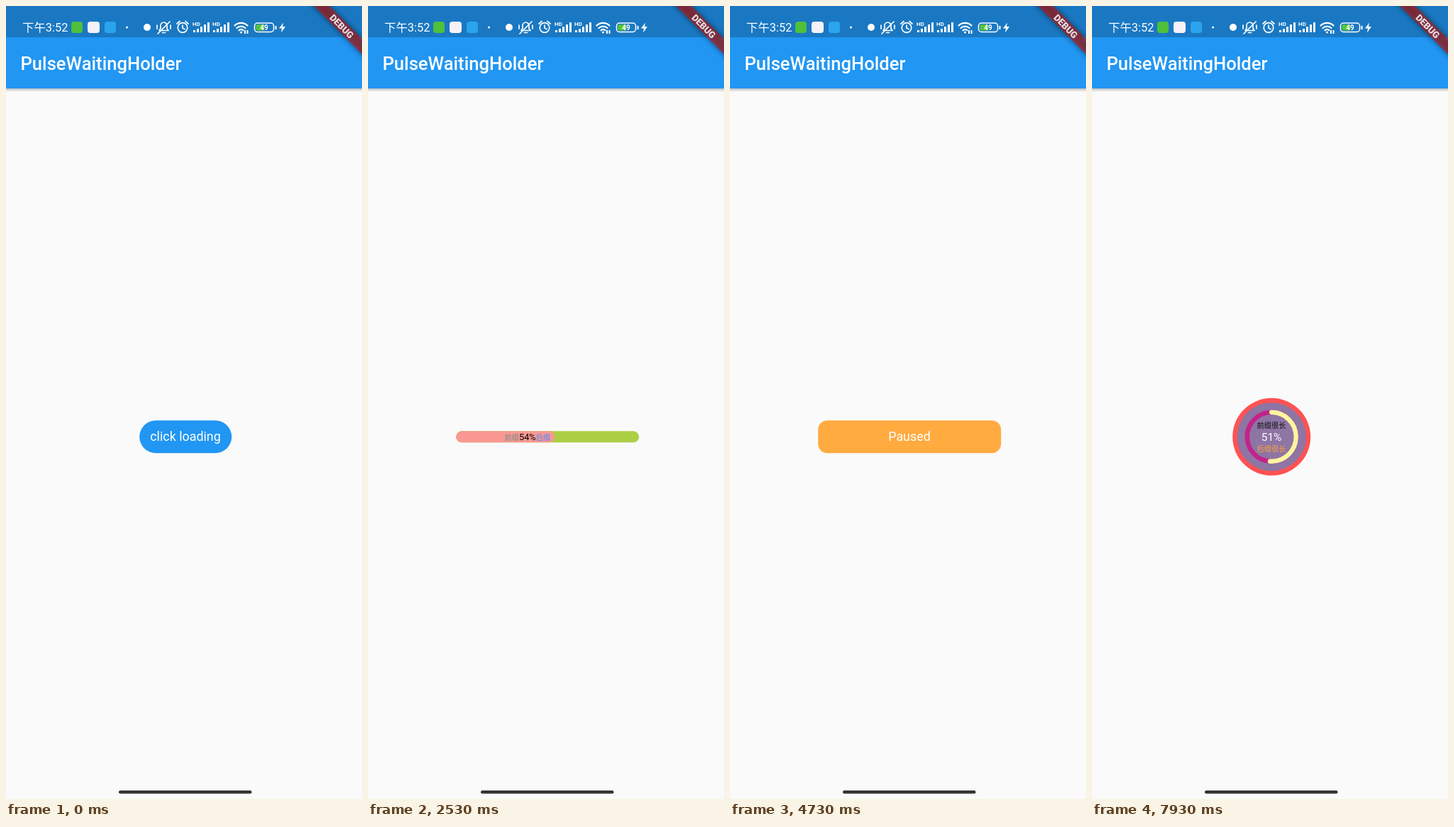
Animation, 502 px wide and 1116 px high, one loop 8000 ms. Source, as an HTML page:

```html
<!DOCTYPE html>
<html lang="zh">
<head>
<meta charset="utf-8">
<title>Button states</title>
<style>
html, body { margin: 0; width: 100%; height: 100%; overflow: hidden; background: #fafafa; }
svg { display: block; width: 100%; height: 100%; }
text { font-family: Roboto, "Noto Sans CJK SC", "Noto Sans CJK", sans-serif; }
.mid { text-anchor: middle; }
.line { fill: none; stroke: #fff; stroke-width: 1.7; stroke-linecap: round; stroke-linejoin: round; }
.soft { filter: blur(4.4px); }
</style>
</head>
<body>
<svg viewBox="0 0 502 1116">
  <defs>
    <linearGradient id="shade" x2="0" y2="1">
      <stop stop-color="#000" stop-opacity=".24"/>
      <stop offset="1" stop-color="#000" stop-opacity="0"/>
    </linearGradient>
    <g id="signal" fill="#fff">
      <text x="-1" y="27.5" font-size="8" font-weight="700">HD</text>
      <path d="M0 34h3v3h-3zM5 32h3v5h-3zM10 29h3v8h-3zM15 26h3v11h-3zM20 23h3v14h-3z"/>
    </g>
  </defs>

  <rect width="502" height="1116" fill="#fafafa"/>
  <rect y="116" width="502" height="5" fill="url(#shade)"/>
  <rect width="502" height="116" fill="#2196f3"/>
  <rect width="502" height="44" fill="#1a78c2"/>
  <text x="20.5" y="90" font-size="25.6" font-weight="500" fill="#fff">PulseWaitingHolder</text>

  <!-- status bar -->
  <text x="23" y="36" font-size="16.4" fill="#fff">下午3:52</text>
  <rect x="92" y="22" width="16" height="16" rx="4" fill="#4fc03a"/>
  <rect x="115" y="22" width="17" height="16" rx="4" fill="#f6f1f6"/>
  <rect x="139" y="22" width="16" height="16" rx="4" fill="#2ba4ee"/>
  <circle cx="170.5" cy="30" r="1.5" fill="#fff"/>
  <circle cx="199" cy="30" r="5" fill="#fff"/>
  <g class="line">
    <path d="M216 34.5h13l-2-3v-4a4.5 4.5 0 0 0-9 0v4zM220.5 37.5h4M214 39l17-17M213 27v5M232 27v5"/>
    <circle cx="249" cy="30.5" r="6.8"/>
    <path d="M249 27v4l3 1.5M241 25l4-3.5M257 25l-4-3.5"/>
    <path d="M322.5 27.5a13 13 0 0 1 18 0M325.5 31a9 9 0 0 1 12 0M328.5 34.3a4.5 4.5 0 0 1 6 0" stroke-width="2.2"/>
    <rect x="350.5" y="24" width="27" height="12.5" rx="4" stroke-width="1.5"/>
  </g>
  <circle cx="331.5" cy="37" r="1.5" fill="#fff"/>
  <path d="M336 34h2v5h-2zM339.5 34h2v5h-2zM379.5 28h2v5h-2zM391 23.5l-6 8h4l-1 6 6-8.5h-4z" fill="#fff"/>
  <use href="#signal" x="264"/>
  <use href="#signal" x="292"/>
  <rect x="352.5" y="26" width="12" height="8.5" rx="2" fill="#55c43d"/>
  <text class="mid" x="364" y="34" font-size="10" font-weight="700" fill="#fff">49</text>

  <g transform="translate(502 0) rotate(45)">
    <rect class="soft" x="-60" y="32.6" width="120" height="15.4" fill-opacity=".5"/>
    <rect x="-60" y="32.6" width="120" height="15.4" fill="#b71c1c" fill-opacity=".63"/>
    <text class="mid" y="45" font-size="13" font-weight="900" fill="#e9dfe6">DEBUG</text>
  </g>
  <rect x="159" y="1104" width="187.5" height="4.5" rx="2.25" fill="#353535"/>

  <rect id="box"/>
  <text id="label" class="mid" x="253" y="612.3" font-size="17.9" fill="#fff"></text>

  <g id="bar">
    <rect id="fill"/>
    <text id="barText" y="610.5" font-size="10.22" text-anchor="end"><tspan fill="#718a8c">前缀</tspan><tspan id="barNum" font-size="12.78" fill="#000"></tspan><tspan fill="#448aff">后缀</tspan></text>
  </g>

  <g id="ring">
    <rect id="inner"/>
    <g fill="none" stroke-width="6.4" transform="translate(253.2 606.3) rotate(-90)">
      <circle id="track" r="34.5"/>
      <circle id="arc" r="34.5" stroke-linecap="round" pathLength="100"/>
    </g>
    <g class="mid">
      <text x="253" y="594" font-size="10.22" fill="#111">前缀很长</text>
      <text id="ringNum" x="253" y="611.5" font-size="15.34" fill="#fff"></text>
      <text x="253" y="627" font-size="10.22" fill="#ffa03c">后缀很长</text>
    </g>
  </g>
</svg>
<script>
const LOOP = 8000, BAR = 905, PAUSE = 3905, RING = 6380, MORPH = 325, STEP = 30;
const CX = 253.2, CY = 606.3, PAD = 6.4;

const BLUE = [33, 150, 243], GREEN = [76, 175, 80], YELLOW = [255, 235, 59], WHITE = [255, 255, 255],
  RED = [244, 67, 54], CORAL = [255, 82, 82], ORANGE = [255, 171, 64],
  PINK = [233, 30, 99], PURPLE = [156, 39, 176];

// width, height, corner radius
const IDLE = [130, 46, 23], THIN = [258, 16, 8], WIDE = [258, 46, 13], ROUND = [110, 109, 55];

const $ = id => document.getElementById(id);
const set = (id, attrs) => { for (const k in attrs) $(id).setAttribute(k, attrs[k]); };
const mix = (a, b, p) => a.map((v, i) => v + (b[i] - v) * p);
const rgb = c => `rgb(${c.map(Math.round)})`;
const show = (id, on) => set(id, { display: on ? "inline" : "none" });

function rect(id, [w, h, r], color, width = w) {
  set(id, { x: CX - w / 2, y: CY - h / 2, width, height: h, rx: r, ry: r, fill: rgb(color) });
}

function drawBar(size, p) {
  const left = CX - size[0] / 2, width = size[0] * p;
  rect("box", size, mix(GREEN, YELLOW, p));
  rect("fill", size, mix(WHITE, RED, p), width);
  $("barNum").textContent = Math.round(p * 100) + "%";
  const textWidth = $("barText").getComputedTextLength();
  set("barText", { x: left + Math.max(PAD + textWidth, width - PAD) });
}

function drawRing(size, p, m) {
  rect("box", size, mix(ORANGE, CORAL, m));
  rect("inner", [size[0] - 2 * PAD, size[1] - 2 * PAD, Math.max(0, size[2] - PAD)], mix(CORAL, BLUE, p));
  set("track", { stroke: rgb(mix(PINK, PURPLE, p)) });
  set("arc", { stroke: rgb(mix(YELLOW, WHITE, p)), "stroke-dasharray": `${p * 100} 200` });
  $("ringNum").textContent = Math.round(p * 100) + "%";
}

function draw(t) {
  const morph = start => Math.min(1, (t - start) / MORPH);
  const percent = start => Math.min(100, Math.floor((t - start) / STEP)) / 100;
  const inBar = t >= BAR && t < PAUSE, inRing = t >= RING;
  show("bar", inBar);
  show("ring", inRing);
  show("label", !inBar && !inRing);

  if (t < BAR) {
    rect("box", IDLE, BLUE);
    $("label").textContent = "click loading";
  } else if (inBar) {
    drawBar(mix(IDLE, THIN, morph(BAR)), percent(BAR));
  } else if (!inRing) {
    const m = morph(PAUSE);
    rect("box", mix(THIN, WIDE, m), mix(YELLOW, ORANGE, m));
    $("label").textContent = "Paused";
  } else {
    const m = morph(RING);
    drawRing(mix(WIDE, ROUND, m), percent(RING), m);
  }
}

const began = performance.now();
function tick() {
  draw((performance.now() - began) % LOOP);
  requestAnimationFrame(tick);
}
tick();
</script>
</body>
</html>
```
